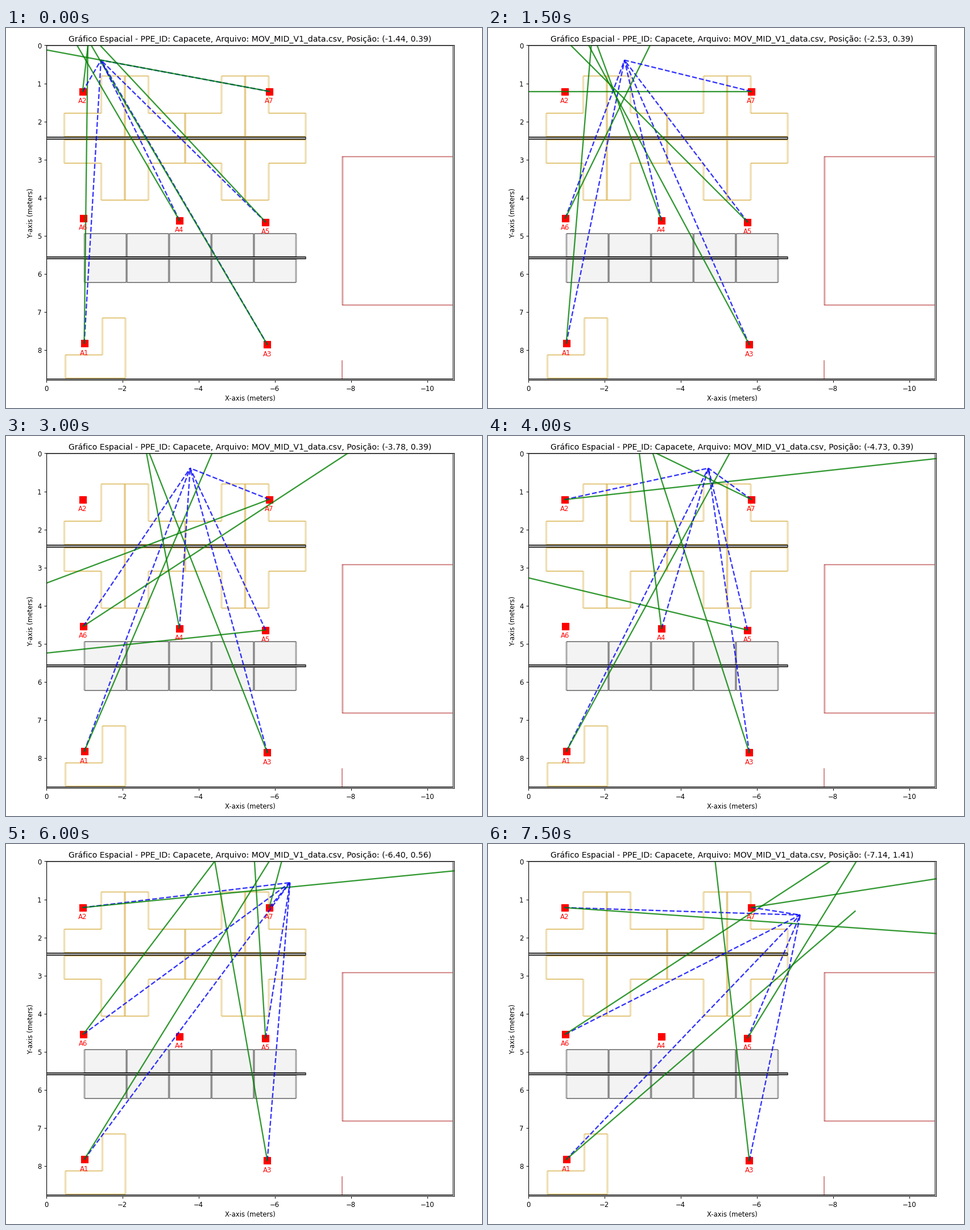
Write a matplotlib script that moves like this. It is 837 px wide and 669 px high and loops after 8000 ms.

```python
import numpy as np
import matplotlib.pyplot as plt
from matplotlib.animation import FuncAnimation
from matplotlib.patches import Rectangle
from matplotlib.transforms import Affine2D

W, H, DPI = 837, 669, 83.7
PX = 72 / DPI  # points per pixel
FRAMES, INTERVAL = 16, 500
RAY = 10  # metres
TITLE = ("Gráfico Espacial - PPE_ID: Capacete, Arquivo: MOV_MID_V1_data.csv, "
         "Posição: ({:.2f}, {:.2f})")

ANCHORS = {
    "A1": (-1.00, 7.83), "A2": (-0.957, 1.215), "A3": (-5.805, 7.86),
    "A4": (-3.50, 4.60), "A5": (-5.76, 4.64), "A6": (-0.977, 4.54),
    "A7": (-5.857, 1.21),
}

# Measured bearing in degrees, keyed by step
BEARINGS = {
    "A1": {0: 89.3, 3: 85.2, 6: 66.8, 8: 61.3, 12: 58.2, 15: 40.7},
    "A2": {0: 83.3, 1: 7.75, 2: 5, 5: 5, 8: 6.3, 10: 3.16, 12: 5.65, 15: -4},
    "A3": {0: 120.45, 3: 118.2, 6: 111.5, 8: 107.85, 10: 109, 12: 99.95, 15: 96.5},
    "A4": {0: 120.3, 3: 110.15, 6: 100.65, 8: 97.2, 10: 93},
    "A5": {0: 133.1, 3: 135, 6: 186, 8: 166.6, 10: 124.9, 12: 93.6, 15: 58.4},
    "A6": {0: 75, 3: 63.9, 6: 33.2, 12: 52.8, 15: 33.15},
    "A7": {0: 169.45, 3: 180, 6: 200.6, 8: 154.1, 10: 134.5, 12: 75, 15: 8.8},
}

# Steps at which an anchor reports nothing
SILENT = {"A1": {10}, "A2": {3, 4, 6}, "A4": {12, 13, 14, 15}, "A6": {0, 1, 8, 9, 10}}

PATH = {
    0: (-1.44, 0.39), 3: (-2.53, 0.39), 6: (-3.78, 0.39), 8: (-4.73, 0.39),
    10: (-5.57, 0.39), 11: (-6.00, 0.42), 12: (-6.40, 0.56),
    13: (-6.71, 0.80), 14: (-6.96, 1.10), 15: (-7.14, 1.41),
}

fig = plt.figure(figsize=((W + 0.01) / DPI, (H + 0.01) / DPI), dpi=DPI, facecolor="white")
left, top, right, bottom = 70.5, 30.5, 787.5, 620.5
ax = fig.add_axes([left / W, 1 - bottom / H, (right - left) / W, (bottom - top) / H])
ax.set_xlim(0, -10.7)
ax.set_ylim(8.8, 0)
ax.set_xticks(range(0, -11, -2))
ax.set_yticks(range(9))
ax.set_xlabel("X-axis (meters)")
ax.set_ylabel("Y-axis (meters)")
title = ax.set_title("")

# Floor plan, in pixels from the top left corner
stage = Affine2D().scale(1 / W, -1 / H).translate(0, 1) + fig.transFigure


def seg(x0, y0, x1, y1, width, color, alpha=1, z=0.5):
    ax.plot([x0, x1], [y0, y1], color=color, alpha=alpha, lw=width * PX,
            solid_capstyle="butt", transform=stage, zorder=z, snap=False)


def outline(points, color, side=(3.5, 0.42), flat=(2, 0.75)):
    for (x0, y0), (x1, y1) in zip(points, points[1:] + points[:1]):
        width, alpha = side if x0 == x1 else flat
        seg(x0, y0, x1, y1, width, color, alpha)


def box(x0, y0, x1, y1):
    return [(x0, y0), (x1, y0), (x1, y1), (x0, y1)]


def desk(inner, step, outer, back, shelf, tip):
    outline([(inner, tip), (step, tip), (step, shelf), (outer, shelf),
             (outer, back), (inner, back)], TAN)


def wall(y0, y1):
    ax.add_patch(Rectangle((71, y0), 456, y1 - y0, fc="white", lw=0,
                           transform=stage, zorder=0.6))
    for y in (y0, y1):
        seg(71, y, 527.5, y, 1.7, "black", z=0.7)
    seg(527, y0, 527, y1, 1.5, "#333333", z=0.7)


TAN, GREY, RED = "#dab450", "#6a6a6a", "#b84040"

for rows in ((191, 150, 84.5), (197, 238, 303)):
    for inner, step, outer in ((209, 167.5, 102.5), (209, 250.5, 315),
                               (420.5, 379, 315), (420.5, 462, 527)):
        desk(inner, step, outer, *rows)
desk(210, 169.5, 104.5, 616.5, 575.5, 510.5)

for y0, y1 in ((362, 403), (407, 448)):
    for x in 138 + 74.6 * np.arange(5):
        ax.add_patch(Rectangle((x, y0), 74.6, y1 - y0, fc="#f3f3f3", lw=0,
                               transform=stage, zorder=0.3))
        outline(box(x, y0, x + 74.6 - 1, y1), GREY, (3, 0.55), (2, 0.8))

wall(192.3, 195.6)
wall(403.2, 406.2)

seg(591.8, 226, 591.8, 488, 3, RED, 0.5)
for y in (226.5, 487.7):
    seg(591, y, 786, y, 1.7, RED, 0.75)
seg(591, 585, 591, 618, 1.7, RED, 0.7)

seg(71.5, 31, 71.5, 618, 1.2, "black")
seg(71, 31, 787, 31, 1, "black")
seg(71, 618.2, 787, 618.2, 1.6, "black")
seg(786.2, 31, 786.2, 618, 2, "#777777")

ax.scatter(*zip(*ANCHORS.values()), s=100, marker="s", color="red", zorder=1)
links, rays = {}, {}
for name, (x, y) in ANCHORS.items():
    ax.text(x, y + 0.3, name, color="red", fontsize=10, ha="center")
    links[name], = ax.plot([], [], "--", color="blue", lw=2, alpha=0.8)
    rays[name], = ax.plot([], [], "-", color="green", lw=2, alpha=0.8)


def at(keys, i):
    return np.interp(i, list(keys), list(keys.values()))


def update(i):
    px, py = (at({k: p[c] for k, p in PATH.items()}, i) for c in (0, 1))
    title.set_text(TITLE.format(px, py))
    for name, (x, y) in ANCHORS.items():
        a = np.radians(at(BEARINGS[name], i))
        links[name].set_data([x, px], [y, py])
        rays[name].set_data([x, x - RAY * np.cos(a)], [y, y - RAY * np.sin(a)])
        shown = i not in SILENT.get(name, ())
        links[name].set_visible(shown)
        rays[name].set_visible(shown)
    return [title, *links.values(), *rays.values()]


anim = FuncAnimation(fig, update, frames=FRAMES, interval=INTERVAL,
                     repeat=True, repeat_delay=0, blit=False)
plt.show()
```
